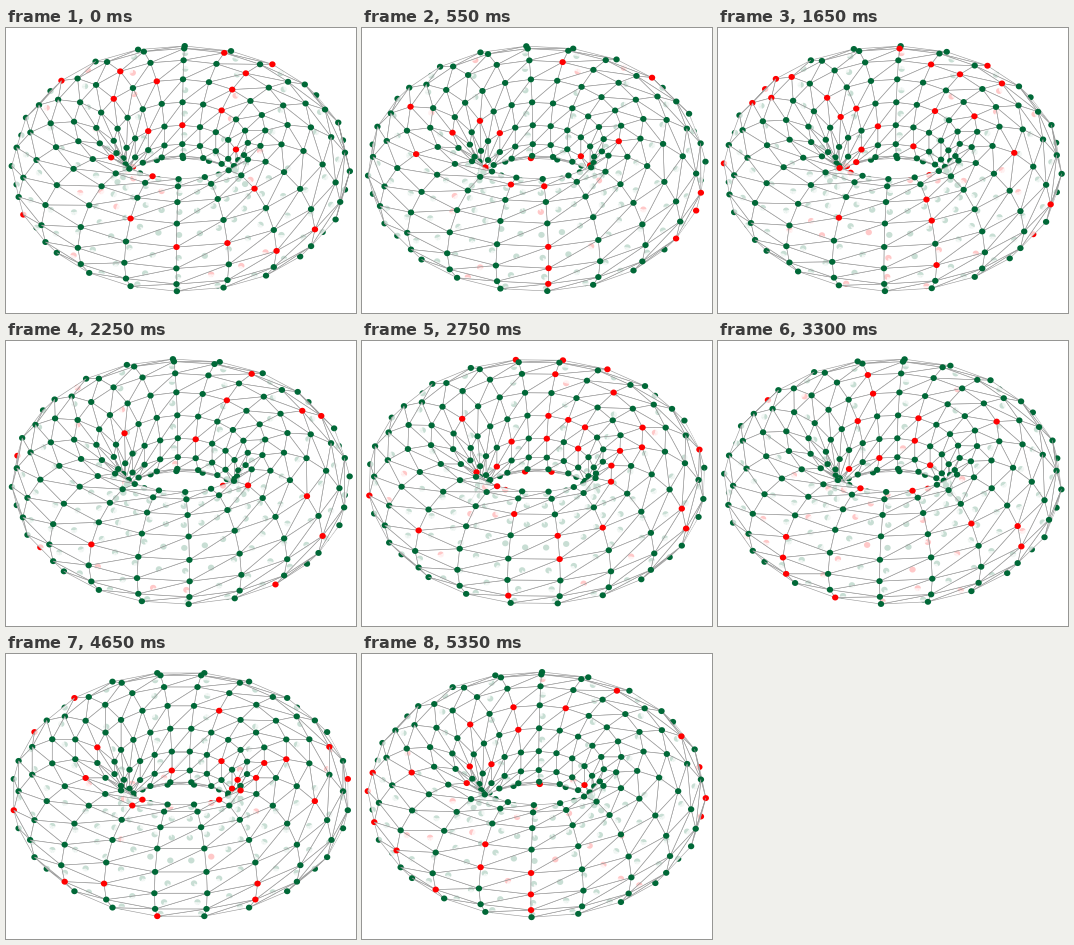
Write a matplotlib script that moves like this. It is 350 px wide and 285 px high and loops after 5400 ms.

```python
import numpy as np
import matplotlib.pyplot as plt
from matplotlib.animation import FuncAnimation
from matplotlib.collections import PolyCollection

W, H, DPI = 350, 285, 100
COLS, RINGS = 20, 15
MAJOR, MINOR = 112.7, 56.4
CX, CY = 174.8, 140.6
TILT = np.radians(36.2)
FRAMES, HOLD, PERIOD = 108, 3, 36   # PERIOD frames turn the mesh by one column
DENSITY = 0.14

GREEN = (0, 0.408, 0.216, 1)
RED = (1, 0, 0, 1)
VEIL = (1, 1, 1, 0.79)
LINE = (0.6, 0.6, 0.6, 1)
CLEAR = (1, 1, 1, 0)

ring, col = np.divmod(np.arange(COLS * RINGS), COLS)
tube = 2 * np.pi * ring / RINGS
rho = MAJOR + MINOR * np.cos(tube)
height = MINOR * np.sin(tube)


def node(r, c):
    return (r % RINGS) * COLS + c % COLS


a, b = node(ring, col), node(ring, col + 1)
c, d = node(ring + 1, col + 1), node(ring + 1, col)
tris = np.vstack([np.column_stack([a, b, c]), np.column_stack([a, c, d])])

t = np.linspace(0, 2 * np.pi, 16, endpoint=False)
disc = np.column_stack([3.2 * np.cos(t), 3.0 * np.sin(t)])


def project(n):
    """Screen positions, depth and facing (larger is nearer the viewer)."""
    ang = 2 * np.pi * col / COLS + np.radians((n % PERIOD) / 2 - 1.5)
    near = np.cos(ang)
    x = CX + rho * np.sin(ang)
    y = CY + rho * near * np.sin(TILT) - height * np.cos(TILT)
    depth = rho * near * np.cos(TILT) + height * np.sin(TILT)
    facing = np.cos(tube) * near * np.cos(TILT) + np.sin(tube) * np.sin(TILT)
    return np.column_stack([x, y]), depth, facing


def red_nodes(state):
    rng = np.random.default_rng(state)
    return rng.random(COLS * RINGS) < DENSITY


fig = plt.figure(figsize=(W / DPI, H / DPI), dpi=DPI, facecolor="white")
ax = fig.add_axes([0, 0, 1, 1])
ax.set_xlim(0, W)
ax.set_ylim(H, 0)
ax.axis("off")
mesh = PolyCollection([], joinstyle="round")
ax.add_collection(mesh, autolim=False)

widths = np.r_[np.full(len(tris), 0.6 * 72 / DPI), np.zeros(len(rho))]


def draw(n):
    pos, depth, facing = project(n)
    corners = pos[tris]
    u, v = corners[:, 1] - corners[:, 0], corners[:, 2] - corners[:, 0]
    front = u[:, 0] * v[:, 1] - u[:, 1] * v[:, 0] < 0

    red = red_nodes(n // HOLD)
    dots = pos[:, None] + disc
    fill = np.vstack([np.tile(VEIL, (len(tris), 1)),
                      np.where(red[:, None], RED, GREEN)])
    edge = np.vstack([np.where(front[:, None], LINE, CLEAR),
                      np.tile(CLEAR, (len(dots), 1))])

    # Nodes are pulled forward so that they sit on their own faces
    lift = np.where(facing > -0.2, 22, 6)
    order = np.argsort(np.r_[depth[tris].mean(axis=1), depth + lift])
    shapes = list(corners) + list(dots)
    mesh.set_verts([shapes[i] for i in order])
    mesh.set_facecolor(fill[order])
    mesh.set_edgecolor(edge[order])
    mesh.set_linewidth(widths[order])
    return mesh,


anim = FuncAnimation(fig, draw, frames=FRAMES, interval=50,
                     repeat=True, repeat_delay=0)
plt.show()
```
